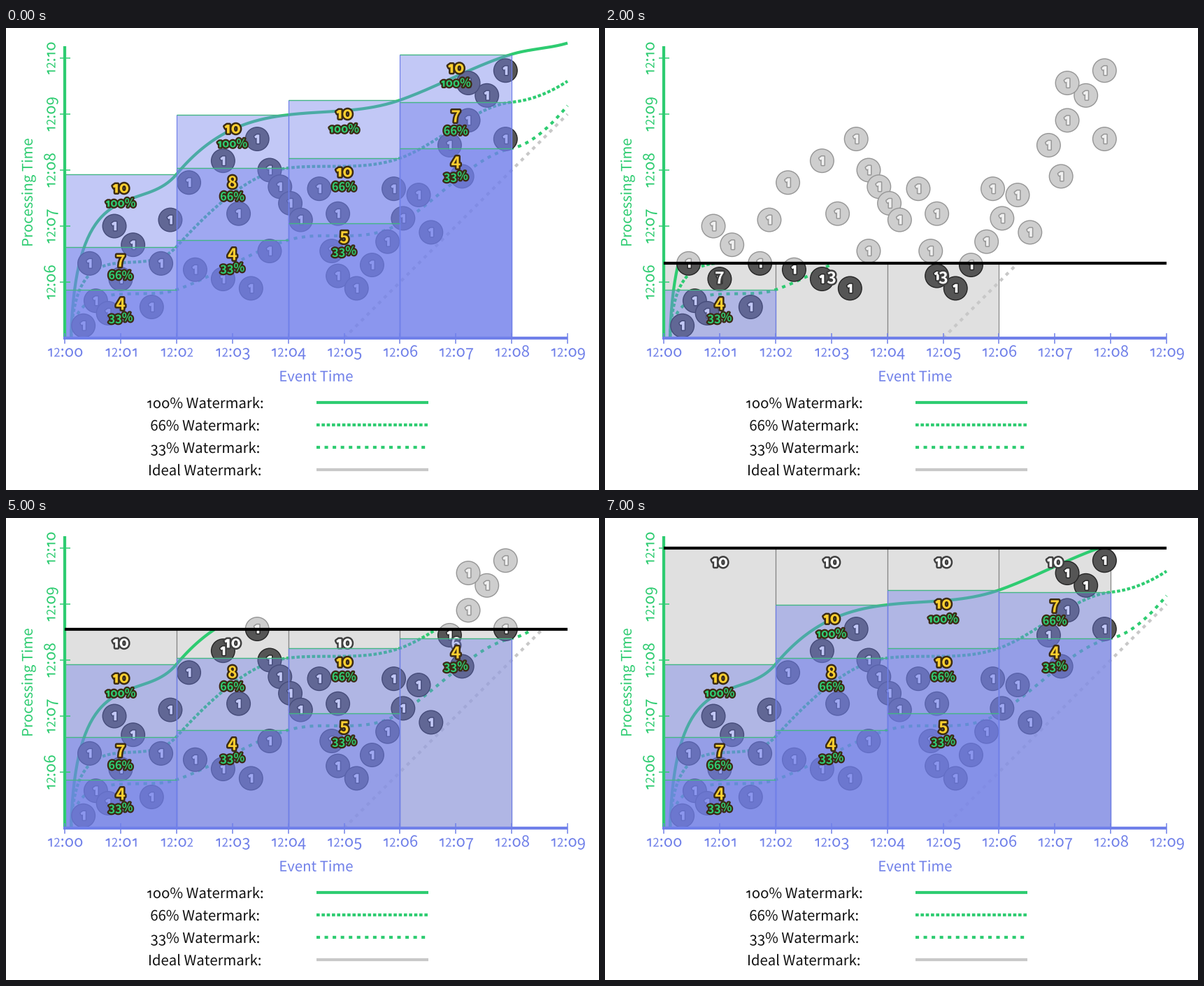
A matplotlib script that plays this animation: 848x660 px, repeating every 8000 ms.

```python
import numpy as np
import matplotlib.pyplot as plt
from matplotlib.animation import FuncAnimation
from matplotlib.patches import Circle, PathPatch, Rectangle
from matplotlib.path import Path
from matplotlib.textpath import TextPath
from matplotlib.transforms import Affine2D

W, H, DPI = 848, 660, 80
PX = 72 / DPI  # one pixel in points
GREEN, BLUE, GREY = "#2ecc71", "#7080e9", "#c8c8c8"
LEFT, RIGHT, BASE = 84, 803, 443
MINUTE = 79.9
STEP = 80 / 9  # nine clock ticks per minute
COL = 2 * MINUTE
FINE, COARSE = (0, (1.1, 0.65)), (0, (1.2, 1.55))

# Straight runs of events in clock ticks: first, last, how many
RUNS = [
    ((3, 2), (5, 6), 2), ((4, 12), (8, 18), 2), ((11, 15), (7, 4), 3), ((14, 5), (17, 19), 3),
    ((21, 11), (30, 8), 3), ((28, 20), (33, 14), 2), ((20, 25), (31, 32), 3), ((33, 27), (38, 19), 4),
    ((41, 24), (44, 20), 2), ((43, 14), (44, 10), 2), ((47, 8), (57, 23), 5), ((53, 24), (59, 17), 2),
    ((64, 26), (71, 32), 2), ((62, 31), (71, 43), 4), ((65, 41), (65, 41), 1),
]
EVENTS = np.vstack([np.linspace(a, b, n) for a, b, n in RUNS])
SPOTS = np.c_[LEFT + EVENTS[:, 0] * MINUTE / 9, BASE - EVENTS[:, 1] * STEP]
WINDOW = EVENTS[:, 0] // 18

# Watermark: line style, pull of the first arc, height and slope at each window's end
LEVELS = {
    "100%": ("-", 198, (209, 124, 103, 37.5, 21.5), (-1.2, -.12, -.35, -.3, -.3)),
    "66%": (FINE, 279, (312.5, 200, 186, 106, 76), (-1.1, -.12, -.35, -.1, -.65)),
    "33%": (COARSE, 353, (374, 303, 279, 172, 111), (-.35, -.3, -.6, -.2, -1.2)),
}

fig = plt.figure(figsize=(W / DPI, H / DPI), dpi=DPI, facecolor="white")
ax = fig.add_axes([0, 0, 1, 1])
ax.set_xlim(0, W)
ax.set_ylim(H, 0)
ax.axis("off")


def watermark(pull, heights, slopes):
    """Chain of Bezier arcs meeting at the window ends."""
    p, out = np.array((93, BASE - 1)), []
    grip = np.array((100, pull))
    t = np.linspace(0, 1, 40)[:, None]
    for i, (y, slope) in enumerate(zip(heights, slopes)):
        q = np.array((min(LEFT + (i + 1) * COL, RIGHT), y))
        arm = (q[0] - p[0]) / 3 * np.array((1, slope))
        out.append((1 - t) ** 3 * p + 3 * t * (1 - t) ** 2 * grip
                   + 3 * t * t * (1 - t) * (q - arm) + t ** 3 * q)
        reach = COL / 3 if i < 3 else MINUTE / 3
        p, grip = q, q + reach * np.array((1, slope))
    return np.vstack(out)


def one(size, bold):
    """Footless figure one at x-height."""
    w, r = (0.16, 0.36) if bold else (0.085, 0.32)
    pts = [(r, 0), (r, .54), (r - w, .54), (.05, .43), (.05 + .4 * w, .43 - .75 * w),
           (r - w, .51 - w), (r - w, 0), (r, 0)]
    return Path(np.array(pts) * size, closed=True), .44 * size


def glyph(char, size, bold):
    prop = dict(family="Noto Sans CJK JP", weight="bold" if bold else "normal")

    def shape(s):
        return TextPath((0, 0), s, size=size, prop=prop)
    advance = shape(char + "H").vertices[:, 0].max() - shape("H").vertices[:, 0].max()
    return (None if char == " " else shape(char)), advance


cache = {}


def word(text, size, bold=False):
    """Outline of the text with old-style figures, centred on x = 0."""
    key = text, size, bold
    if key not in cache:
        parts, x = [], 0
        for c in text:
            if c == "1":
                path, adv = one(size, bold)
            elif c == "2":
                path, adv = glyph(c, size * 0.76, bold)
            else:
                path, adv = glyph("o" if c == "0" else c, size, bold)
            drop = -0.18 * size if c in "34579" else 0
            if path is not None:
                parts.append(path.transformed(Affine2D().translate(x, drop)))
            x += adv
        path = Path.make_compound_path(*parts)
        box = path.get_extents()
        cache[key] = path.transformed(Affine2D().translate(-(box.x0 + box.x1) / 2, 0))
    return cache[key]


def write(text, x, y, size, color, z, turn=0):
    """Text centred at x on the baseline y."""
    place = Affine2D().scale(1, -1).rotate_deg(turn).translate(x, y)
    ax.add_patch(PathPatch(word(text, size).transformed(place), fc=color, lw=0, zorder=z))


def badge(text, x, y, size, color, outline, width, z):
    """Bold outlined text centred on a point."""
    path = word(text, size, True)
    box = path.get_extents()
    path = path.transformed(Affine2D().translate(0, -(box.y0 + box.y1) / 2).scale(1, -1).translate(x, y))
    return [ax.add_patch(PathPatch(path, fc=outline, ec=outline, lw=width * PX, joinstyle="round", zorder=z)),
            ax.add_patch(PathPatch(path, fc=color, lw=0, zorder=z + 0.001))]


def stroke(xs, ys, color, width, z, style="-"):
    return ax.plot(xs, ys, color=color, lw=width * PX, ls=style, zorder=z,
                   solid_capstyle="butt", dash_capstyle="butt")


def disc(x, y, fill, edge, text, z):
    return [ax.add_patch(Circle((x, y), 16.8, fc=fill, ec=edge, lw=1.4 * PX, zorder=z)),
            *badge("1", x - 0.5, y, 23, text, edge, 3, z + 0.001)]


def pane(col, top, fill, edge, z, alpha=1):
    x = LEFT + col * COL
    made = [ax.add_patch(Rectangle((x, top), COL, BASE - top, fc=fill, lw=0, alpha=alpha, zorder=z))]
    for side in (x, x + COL):
        made += stroke([side, side], [top, BASE], edge, 1.2, z)
    return made


def count(col, top):
    """Events of a window that arrived by the given height."""
    return int(np.sum((WINDOW == col) & (SPOTS[:, 1] >= top - 0.5)))


def draw_frame():
    stroke([LEFT, LEFT], [26, BASE + 1], GREEN, 4.2, 9)
    stroke([LEFT - 2, RIGHT], [BASE, BASE], BLUE, 4.2, 9.1)
    for i in range(10):
        x = LEFT + i * MINUTE
        stroke([x, x], [436, 451], BLUE, 1.5, 9)
        write(f"12:0{i}", x + 0.5, 469.5, 22, BLUE, 9)
    for i in range(1, 6):
        y = BASE - 80 * i
        stroke([77, 92], [y, y], GREEN, 1.5, 9)
        write(f"12:{5 + i:02d}", 70.5, y + 0.5, 22, GREEN, 9, -90)
    write("Event Time", 444, 504.7, 20.3, BLUE, 9)
    write("Processing Time", 37.8, 234.5, 20.3, GREEN, 9, -90)
    for i, name in enumerate([*LEVELS, "Ideal"]):
        y = 535.2 + 32 * i
        write(f"{name} Watermark:", 284.5, y + 7.8, 20.3, "#111111", 9)
        color, style = (GREEN, LEVELS[name][0]) if name in LEVELS else (GREY, "-")
        stroke([444, 603.5], [y, y], color, 4.2, 9, style)


draw_frame()
CURVES = [(watermark(*rest), GREEN, style) for style, *rest in LEVELS.values()]
CURVES.append((np.array([(LEFT + 5 * MINUTE, BASE), (RIGHT, BASE - 320)]), GREY, COARSE))
live = []


def update(i):
    while live:
        live.pop().remove()
    running = i > 0
    now = BASE - (5 + round(20 / 3 * (i - 1))) * STEP if running else 0

    past = []
    for curve, color, style in CURVES:
        past += stroke(*curve.T, color, 4.2, 3, style)
    for n, (x, y) in enumerate(SPOTS):
        if y + 18 > now:
            past += disc(x, y, "#555555", "#262626", "white", 4 + n / 100)
        if running and y - 18 < now:
            live.extend(disc(x, y, "#cecece", "#969696", "#f0f0f0", 1 + n / 100))
    for a in past:
        a.set_clip_path(Rectangle((0, now), W, H, transform=ax.transData))
    live.extend(past)

    for col in range(4):
        x = LEFT + col * COL
        mid = x + COL / 2
        if running and count(col, now):
            live.extend(pane(col, now, "#e0e0e0", "#858585", 2))
            live.extend(badge(str(count(col, now)), mid, now + 20.3, 23, "white", "#404040", 5, 5))
        for name, (_, _, heights, _) in LEVELS.items():
            top = heights[col]
            if top < now:
                continue
            live.extend(pane(col, top, "#7280eb", BLUE, 6, 0.43))
            live.extend(stroke([x, x + COL], [top, top], "#43b685", 1.4, 6.1))
            live.extend(badge(str(count(col, top)), mid, top + 20, 23, "#ffd02f", "#3b2b14", 5, 7))
            live.extend(badge(name, mid, top + 40.3, 16.3, GREEN, "#3b2b14", 4.6, 7.1))
    if running:
        live.extend(stroke([LEFT, RIGHT], [now, now], "black", 4.2, 10))
    return live


anim = FuncAnimation(fig, update, frames=8, interval=1000, init_func=lambda: update(0),
                     repeat=True, repeat_delay=0, blit=False)
plt.show()
```
